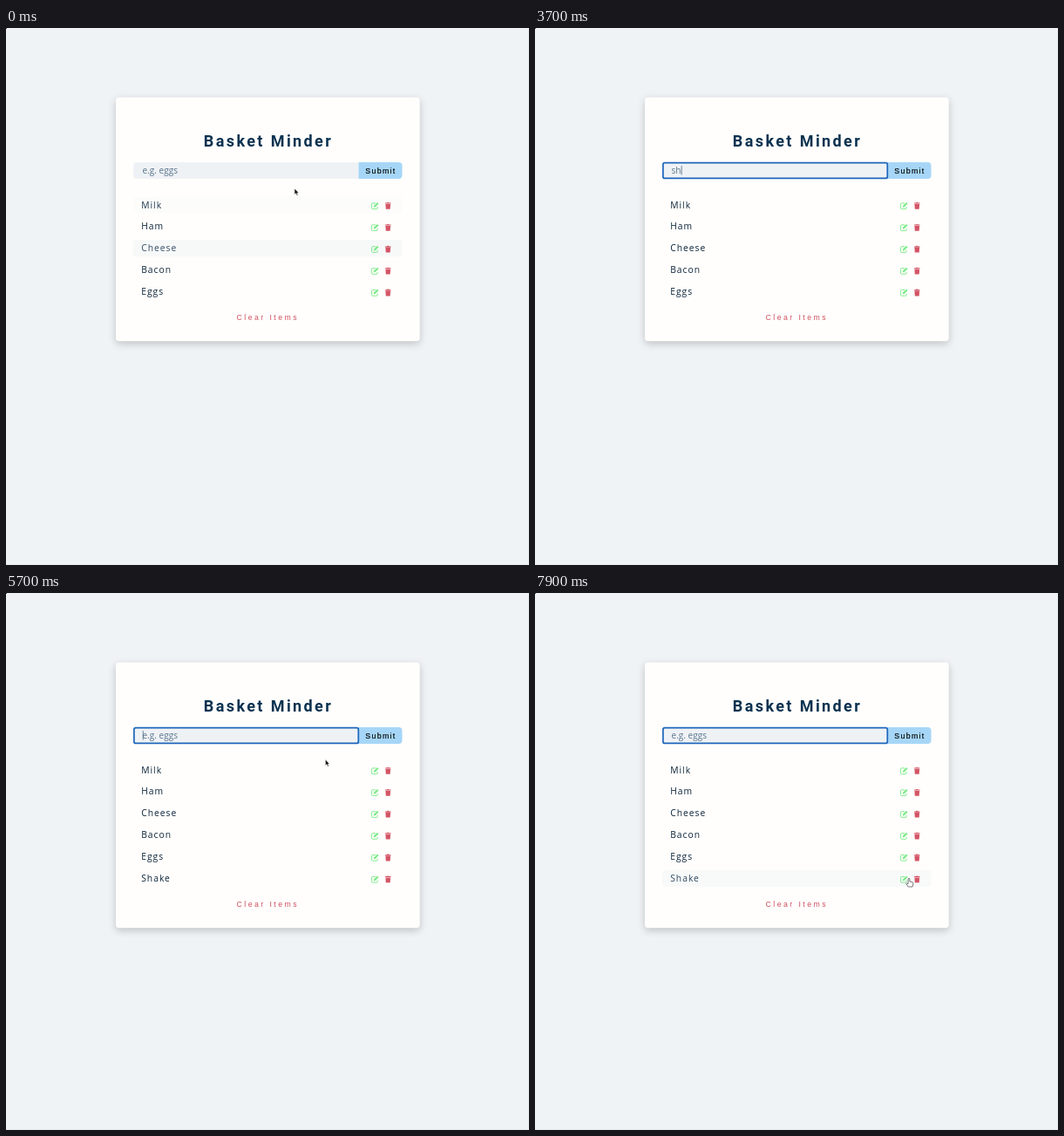
Animation, 600 px wide and 616 px high, one loop 8000 ms. Source, as an HTML page:

```html
<!DOCTYPE html>
<html lang="en">
<head>
<meta charset="utf-8">
<title>Shopping list</title>
<style>
  html, body { margin: 0; height: 100%; overflow: hidden; background: #eff3f6; }
  svg { display: block; }
  text { font-family: "Open Sans", sans-serif; white-space: pre; }
  .middle { text-anchor: middle; }
  #card { fill: #fffefc; filter: drop-shadow(0 3px 4.5px rgba(0, 0, 0, .2)); }
  #alert rect { fill: #d3f0d8; }
  #alert text { font-size: 7px; letter-spacing: 2.5px; fill: #23663a; }
  #title { font: bold 18px Roboto, sans-serif; letter-spacing: 2.4px; fill: #0a3250; }
  #value { font-size: 10px; fill: #58748c; }
  #submit { font: 8.8px "Liberation Sans", Arial, sans-serif; letter-spacing: 1.35px; fill: #000; stroke: #000; stroke-width: .15; }
  #clear { font: 8.7px "Liberation Sans", Arial, sans-serif; letter-spacing: 2.45px; fill: #cf4f60; }
  .item text { font-size: 10.3px; font-weight: 500; letter-spacing: 1px; }
  .item rect { fill: #eef2f5; }
  #pointer path { stroke-width: .6; }
</style>
</head>
<body>
<svg width="600" height="616" viewBox="0 0 600 616">
  <defs>
    <g id="icons">
      <path d="M5 1.3H1.4Q.6 1.3 .6 2V7.3Q.6 8 1.4 8H6.4Q7.1 8 7.1 7.3V5.4" fill="none" stroke="#78ea84" stroke-width=".9"/>
      <path d="M2.8 6 3.1 4.3 7 .4 8.5 1.9 4.6 5.8Z" fill="#78ea84"/>
      <path d="M15.9 1H18L18.4.4H20.2L20.6 1H22.6V2H15.9ZM16.4 2.4H22.1L21.7 8.2H16.8Z" fill="#d35566"/>
    </g>
  </defs>
  <path d="M599.5 0V615.5H0" fill="none" stroke="#e4e9ed"/>
  <rect width="1" height="1" fill="#444"/>
  <rect id="card" x="126" y="79.5" width="348.7" rx="4"/>
  <g id="alert">
    <rect x="146" y="99.4" width="308.5" height="12.5" rx="3"/>
    <text class="middle" x="301.2" y="108.3">Item Added To The List</text>
  </g>
  <text id="title" class="middle" x="301" y="136.4">Basket Minder</text>
  <path d="M404.5 154H150Q146 154 146 158V169Q146 173 150 173H404.5Z" fill="#eff2f5"/>
  <path d="M404.5 154H450.5Q454.5 154 454.5 158V169Q454.5 173 450.5 173H404.5Z" fill="#a6d6f7"/>
  <rect id="focus" x="146.9" y="154.7" width="257.4" height="17.7" rx="2" fill="none" stroke="#1d66bc" stroke-width="1.7"/>
  <text id="value" x="156.6" y="166.6"></text>
  <rect id="caret" y="158" width=".8" height="10.5" fill="#4c6880"/>
  <text id="submit" x="412.2" y="166.8">Submit</text>
  <g id="list"></g>
  <text id="clear" class="middle" x="300.3">Clear Items</text>
  <g id="pointer">
    <path id="arrow" d="M0 0V7.2L1.6 5.8 2.8 8.4 4 7.9 2.9 5.4H5Z" fill="#111" stroke="#fff"/>
    <path id="beam" d="M-1.6-3Q0-3 0-2Q0-3 1.6-3M0-2V3M-1.6 4Q0 4 0 3Q0 4 1.6 4M-.9 1H.9" fill="none" stroke="#555"/>
    <path id="hand" d="M-.9.8Q0-.6.9.8V4L4 4.6Q5 5 4.8 6.5L4 10H-.8L-3.2 6.6Q-3.2 5.4-.9 6.6Z" fill="#fff" stroke="#222"/>
  </g>
</svg>
<script>
const DURATION = 8000, PITCH = 24.9, FADE = 300;
const FOCUS = 1000, SUBMIT = 4400, ALERT_END = 5400, POINTER_BACK = 5500;
const items = ['Milk', 'Ham', 'Cheese', 'Bacon', 'Eggs', 'Shake'];
const keyTimes = [3500, 3700, 3900, 4050, 4200];

// [time, x, y]
const path = [
  [0, 331, 184], [300, 323, 168], [POINTER_BACK, 323, 168], [5950, 420, 219],
  [6150, 437, 222], [6500, 437.5, 222.5], [6650, 437, 240], [7050, 436, 265],
  [7550, 434, 290], [7700, 431, 312], [7780, 430, 318], [7880, 429, 327], [DURATION, 429, 327]
];
// [row, enter, leave]
const hovers = [
  [2, -500, -160], [0, -100, -20], [0, 5720, 5900], [1, 5930, 6650],
  [2, 6650, 7050], [3, 7050, 7550], [4, 7580, 7700], [5, 7780, DURATION]
];

const $ = id => document.getElementById(id);
const show = (id, on) => { $(id).style.display = on ? '' : 'none'; };
const clamp = v => Math.max(0, Math.min(1, v));
const rowCenter = row => 203.2 + PITCH * row;

$('list').innerHTML = items.map((name, row) => `
  <g class="item" transform="translate(0 ${PITCH * row})">
    <rect x="146" y="193.2" width="308.5" height="19.4" rx="4"/>
    <text x="155.2" y="206.6">${name}</text>
    <use href="#icons" x="419" y="199.6"/>
  </g>`).join('');
const rows = [...document.querySelectorAll('.item')];

function pointerAt(t) {
  const i = Math.max(1, path.findIndex(p => p[0] > t));
  const [t0, x0, y0] = path[i - 1], [t1, x1, y1] = path[i];
  const k = (t - t0) / (t1 - t0);
  return [x0 + (x1 - x0) * k, y0 + (y1 - y0) * k];
}

function hoverLevel(row, t) {
  return Math.max(0, ...hovers.filter(h => h[0] === row).map(([, enter, leave]) =>
    clamp((Math.min(t, leave) - enter) / FADE) - Math.max(0, t - leave) / FADE));
}

function drawPointer(t, typing) {
  const [x, y] = pointerAt(t);
  const beam = y < 173;
  const hand = !beam && x > 418 && x < 443 && items.some((_, row) => Math.abs(y - rowCenter(row)) < 5);
  $('pointer').setAttribute('transform', `translate(${x} ${y})`);
  show('pointer', !typing);
  show('beam', beam);
  show('hand', hand);
  show('arrow', !beam && !hand);
}

function drawInput(t) {
  const typed = t < SUBMIT ? 'shake'.slice(0, keyTimes.filter(k => k <= t).length) : '';
  $('value').textContent = typed || 'e.g. eggs';
  const lastInput = t >= SUBMIT ? SUBMIT : Math.max(FOCUS, ...keyTimes.filter(k => k <= t));
  $('caret').setAttribute('x', 156.8 + (typed ? $('value').getComputedTextLength() : 0));
  show('caret', t >= FOCUS && (t - lastInput) % 1000 < 500);
  show('focus', t >= FOCUS);
}

function draw(t) {
  const added = t >= SUBMIT;
  const growth = added ? PITCH : 0;
  $('card').setAttribute('height', 279.8 + growth);
  $('clear').setAttribute('y', 335.2 + growth);
  show('alert', added && t < ALERT_END);
  rows.forEach((item, row) => {
    const level = hoverLevel(row, t);
    item.style.display = row < 5 || added ? '' : 'none';
    item.querySelector('rect').style.opacity = level;
    item.querySelector('text').style.fill = `color-mix(in srgb, #617d98 ${level * 100}%, #0c243a)`;
  });
  drawInput(t);
  drawPointer(t, t >= keyTimes[0] && t < POINTER_BACK);
}

function loop() {
  draw(performance.now() % DURATION);
  requestAnimationFrame(loop);
}
loop();
</script>
</body>
</html>
```
